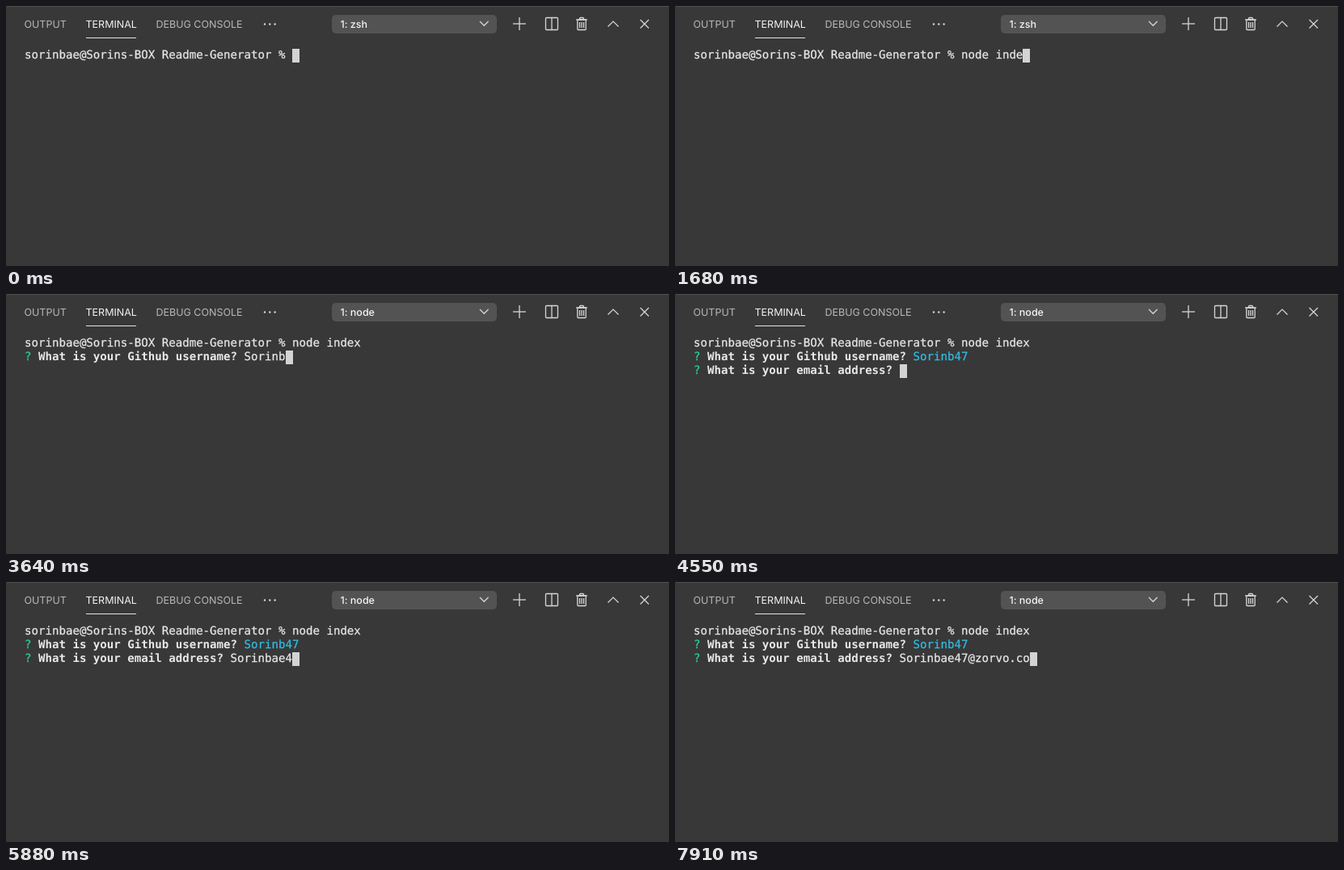
An HTML page with a canvas that plays this animation: 820 by 322 pixels, repeating every 8 s.

```html
<!DOCTYPE html>
<html lang="en">
<head>
<meta charset="utf-8">
<title>Terminal</title>
<style>
  html, body { margin: 0; width: 100%; height: 100%; overflow: hidden; background: #383838; }
  canvas { display: block; }
</style>
</head>
<body>
<canvas id="stage" width="820" height="322"></canvas>
<script>
const ctx = document.getElementById('stage').getContext('2d');
const LOOP = 8000;
const KEY_GAP = 116; // ms between keys within a burst
const MONO = '14.1px "DejaVu Sans Mono", monospace';
const TAB = '12.5px Inter, sans-serif';
const TITLE = '500 12.5px Inter, sans-serif';
const LEFT = 23, TOP = 53, CELL = 8.487, ROW = 17;
const TEXT = '#e8e8e8', ICON = '#d6d6d6', GREEN = '#29cf93', CYAN = '#30bce3';

const PROMPT = 'sorinbae@Sorins-BOX Readme-Generator % ';
const ASK_USER = 'What is your Github username? ';
const ASK_MAIL = 'What is your email address? ';

// Typing happens in bursts: start time and the keys struck at an even pace
const command = { 560: 'no', 910: 'de i', 1400: 'ndex' };
const user = { 2660: 'S', 3010: 'orin', 3570: 'b', 3780: '47' };
const mail = {
  4620: 'Sorinba', 5460: 'e4', 5950: '7', 6230: '@',
  6440: 'zo', 6790: 'rv', 7420: 'o.', 7770: 'c', 7910: 'o'
};
const RUN = 1890, RENAME = 1960, FIRST_ASK = 2100, SECOND_ASK = 4060;

function typed(bursts, t) {
  return Object.entries(bursts)
    .map(([start, keys]) => keys.slice(0, Math.max(0, 1 + Math.floor((t - start) / KEY_GAP))))
    .join('');
}

function label(text, x, y, color, font) {
  ctx.font = font;
  ctx.fillStyle = color;
  ctx.fillText(text, x, y);
}

// Writes terminal text and returns the column after it
function put(text, col, row, color = TEXT, bold = false) {
  const x = LEFT + col * CELL, y = TOP + 12 + row * ROW;
  label(text, x, y, color, (bold ? 'bold ' : '') + MONO);
  if (!bold) {
    ctx.strokeStyle = color;
    ctx.lineWidth = 0.25;
    ctx.strokeText(text, x, y);
  }
  return col + text.length;
}

function cursor(col, row) {
  ctx.fillStyle = '#d3d3d3';
  ctx.fillRect(Math.round(LEFT + col * CELL), TOP + row * ROW, 9, ROW);
}

// Strokes a polyline given as x, y pairs
function line(...points) {
  ctx.beginPath();
  for (let i = 0; i < points.length; i += 2) ctx.lineTo(points[i], points[i + 1]);
  ctx.stroke();
}

function box(x, y, w, h, r) {
  ctx.beginPath();
  ctx.roundRect(x, y, w, h, r);
}

// A V of half-width s; a negative h points it upward
function chevron(x, y, s, h) {
  line(x - s, y - h / 2, x, y + h / 2, x + s, y - h / 2);
}

function trash(x, y) {
  line(x - 7, y - 5, x + 7, y - 5);
  box(x - 2.5, y - 7.5, 5, 2.5, 1);
  ctx.stroke();
  box(x - 5.2, y - 5, 10.4, 12.5, 1);
  ctx.stroke();
  for (let dx = -2.5; dx <= 2.5; dx += 2.5) line(x + dx, y - 2, x + dx, y + 5);
}

function tabs() {
  label('OUTPUT', 22.5, 27, '#b8b8b8', TAB);
  label('TERMINAL', 98.5, 27, '#f2f2f2', TAB);
  label('DEBUG CONSOLE', 185.5, 27, '#b8b8b8', TAB);
  ctx.fillStyle = '#e4e4e4';
  ctx.fillRect(99, 39, 62, 1);

  ctx.fillStyle = ICON;
  for (let i = 0; i < 3; i++) {
    ctx.beginPath();
    ctx.arc(320 + i * 6.3, 22.5, 1.2, 0, 7);
    ctx.fill();
  }
}

function toolbar(t) {
  ctx.fillStyle = '#505050';
  ctx.fillRect(1, 0, 819, 1);
  tabs();

  ctx.fillStyle = '#535353';
  box(403, 11, 204, 23, 5);
  ctx.fill();
  label(t < RENAME ? '1: zsh' : '1: node', 413.5, 27, '#f4f4f4', TITLE);

  ctx.strokeStyle = ICON;
  ctx.lineWidth = 1.3;
  chevron(591.3, 21.6, 5.3, 5.3);
  line(627, 22, 643, 22);
  line(635, 14, 635, 30);
  box(667.5, 14.5, 15, 15, 1);
  ctx.stroke();
  line(675, 14.5, 675, 29.5);
  trash(712, 22);
  chevron(751, 22.3, 6.5, -6.5);
  line(784.5, 17, 795, 27.5);
  line(795, 17, 784.5, 27.5);
}

function ask(question, row) {
  put('?', 0, row, GREEN);
  return put(question, 2, row, TEXT, true);
}

function terminal(t) {
  let row = 0;
  let col = put(typed(command, t), put(PROMPT, 0, 0), 0);
  if (t >= RUN) {
    row = 1;
    col = 0;
  }
  if (t >= FIRST_ASK) {
    col = put(typed(user, t), ask(ASK_USER, 1), 1, t < SECOND_ASK ? TEXT : CYAN);
  }
  if (t >= SECOND_ASK) {
    row = 2;
    col = put(typed(mail, t), ask(ASK_MAIL, 2), 2);
  }
  cursor(col, row);
}

function draw(t) {
  ctx.fillStyle = '#383838';
  ctx.fillRect(0, 0, 820, 322);
  toolbar(t);
  terminal(t);
}

ctx.textRendering = 'geometricPrecision';
const start = performance.now();
function tick() {
  draw((performance.now() - start) % LOOP);
  requestAnimationFrame(tick);
}
tick();
</script>
</body>
</html>
```
